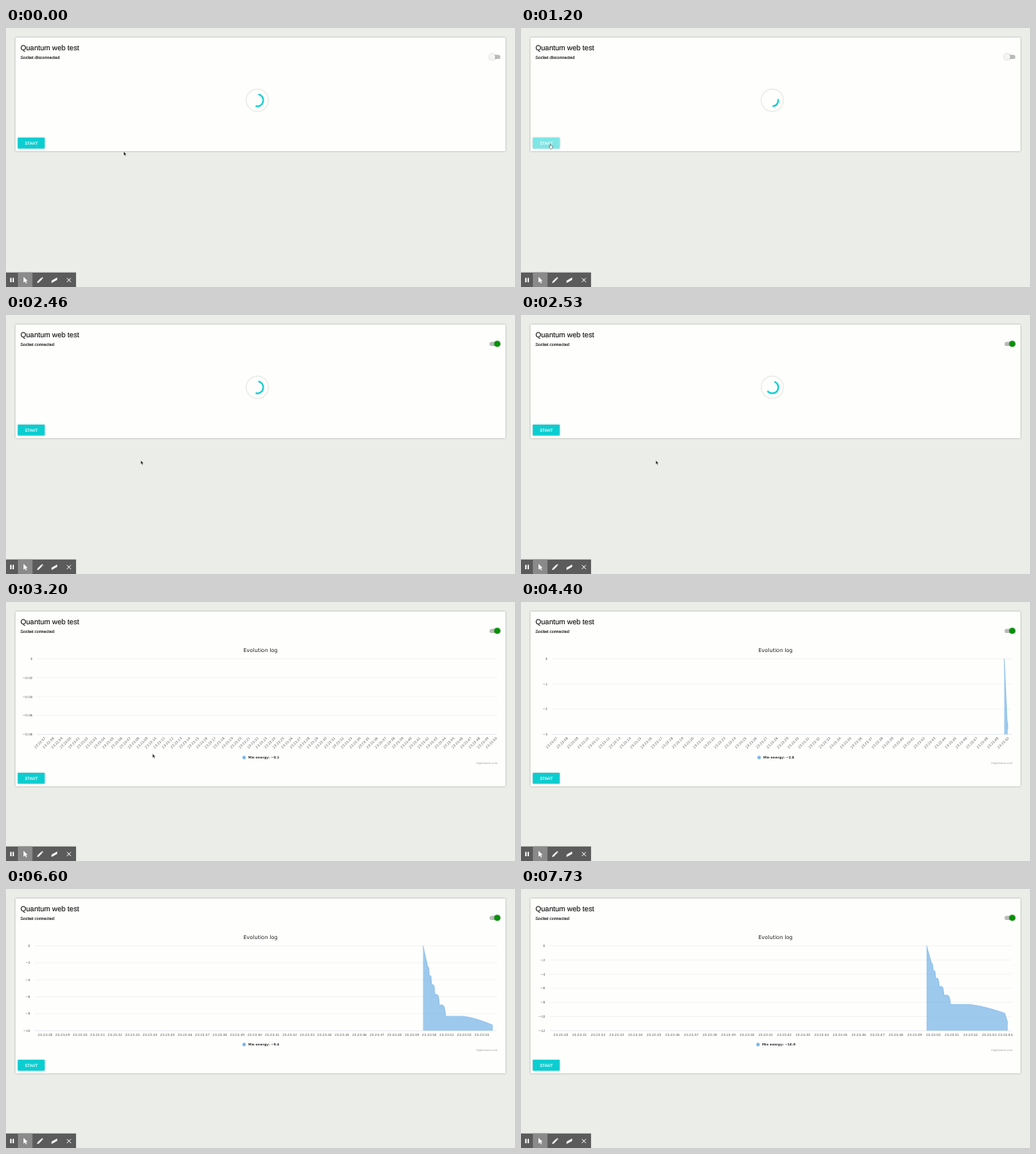
Animation, 640 px wide and 326 px high, one loop 8000 ms. Source, as an HTML page:

```html
<!DOCTYPE html>
<html lang="en">
<head>
<meta charset="utf-8">
<title>Quantum web test</title>
<style>
html, body { margin: 0; height: 100%; overflow: hidden; background: #ebede8; }
svg { display: block; width: 100vw; height: 100vh; text-rendering: geometricPrecision; }
text { font-family: "Liberation Sans", Arial, sans-serif; }
.label { fill: #111; stroke: #111; stroke-width: .12; }
#chart text { font-family: "DejaVu Sans", sans-serif; font-size: 4.1px; fill: #5c5c5c; }
#card { fill: #fefffd; filter: drop-shadow(0 .5px 1.1px rgba(0,0,0,.32)); }
.lift { filter: drop-shadow(0 .4px .8px rgba(0,0,0,.25)); }
</style>
</head>
<body>
<svg viewBox="0 0 640 326">
  <rect id="card" x="12" y="12" width="616" height="143" rx=".8"/>
  <text class="label" x="18.2" y="28.3" font-size="9.1">Quantum web test</text>
  <text class="label" id="status" x="18.2" y="38.6" font-size="5.35"></text>
  <rect x="608" y="33.8" width="13.6" height="5.2" rx="2.6" fill="#b9bcb9"/>
  <circle id="thumb" class="lift" cy="36.3" r="3.8"/>
  <g id="spinner">
    <circle class="lift" cx="316" cy="91" r="13.4" fill="#fefffd"/>
    <path id="arc" fill="none" stroke="#0ccdd0" stroke-width="2"/>
  </g>
  <g id="chart"></g>
  <g id="button">
    <rect class="lift" x="14.8" y="138" width="33.9" height="13.8" rx=".7" fill="#fefffd"/>
    <rect id="face" x="14.8" y="138" width="33.9" height="13.8" rx=".7" fill="#0ccdd0"/>
    <text x="31.9" y="147" font-size="5.2" fill="#fff" stroke="#fff" stroke-width=".12" text-anchor="middle">START</text>
  </g>
  <rect y="307.7" width="88.1" height="18.3" fill="#5b5b5b"/>
  <rect x="15" y="307.7" width="18.3" height="18.3" fill="#8a8a8a"/>
  <g fill="#fff">
    <path d="M5.3 314.5h1.7v5.4h-1.7zM8.3 314.5h1.7v5.4h-1.7z"/>
    <path d="M22 313.3l5.2 5-2.3.2 1.4 2.6-1.1.5-1.3-2.6-1.9 1.6z"/>
    <path d="M39.2 321l.4-1.9 4.5-4.5 1.5 1.5-4.5 4.5zM44.5 314.2l.9-.8 1.4 1.4-.8.9z"/>
    <path d="M57.3 318l7-3.9v3l-7 3.9z"/>
    <path d="M76.6 314.8l5 5M81.6 314.8l-5 5" stroke="#fff" stroke-width="1"/>
  </g>
  <g id="cursor" stroke="#fff" stroke-width=".4">
    <path id="arrow" d="M0 0v5l1.1-1 .8 1.8.9-.4-.8-1.7h1.6z" fill="#111"/>
    <path id="hand" d="M-.6 0q.6-.6 1 0l.2 2 2 .5v2l-.6 1.5h-2.4l-1.4-2.6.6-.4.6.7z" fill="#fff" stroke="#222"/>
  </g>
</svg>
<script>
const LOOP = 8000, OPEN = 2540, TOP = 71.5, RIGHT = 617, TIP = 612, BIRTH = 49.64;
const $ = id => document.getElementById(id);
const set = (id, attrs) => { for (const k in attrs) $(id).setAttribute(k, attrs[k]); };
const clamp = v => Math.max(0, Math.min(1, v));
const mix = (a, b, p) => a + (b - a) * p;
const ease = (t, start, dur) => (1 - Math.cos(Math.PI * clamp((t - start) / dur))) / 2;

// adds eased moves [start, duration, da, db] to a pair of values
const travel = ([a, b], moves, t) => moves.reduce(([x, y], [start, dur, da, db]) => {
  const p = ease(t, start, dur);
  return [x + da * p, y + db * p];
}, [a, b]);

// pointer: to the button, away, then down
const pointer = t => travel([148, 155.5], [[100, 870, -111, -9.5], [1530, 620, 132.5, 37], [2640, 440, 14.8, 8]], t);

// chart window: first visible second and newest sample
const timeSpan = t => travel([-3.9, 49.6],
  [[3530, 330, 7.3, .2], [4060, 1340, 21, 1.15], [5800, 130, 1, 1.22], [6260, 1, 2, 1.46], [6700, 1000, 2, .37]], t);

// steep start, five widening stairs, slow sag, last plunge
function energyAt(u) {
  let v = 2.5 * clamp(u / .27) + 1.15 * (Math.max(0, u - 2.2) / 1.9) ** 1.5 + 1.2 * clamp((u - 4.2) / .16);
  for (let k = 0; k < 5; k++) {
    const end = .35 * 1.385 ** k, start = end / 1.385;
    v += (1 + .08 * k) * clamp((u - start) / (end - start)) ** 7;
  }
  return -v;
}

const minus = s => String(s).replace('-', '\u2212');
const clock = s => '23:' + [23 + Math.floor(s / 60), (s + 60) % 60].map(n => String(n).padStart(2, '0')).join(':');
const text = (x, y, body, more = '') => `<text x="${x}" y="${y}" ${more}>${body}</text>`;
const line = (x, y, color) => `<path d="M${x} ${y}H${RIGHT}" stroke="${color}" stroke-width=".5"/>`;

function chart(t) {
  const [first, tip] = timeSpan(t);
  const value = Math.min(-.08, energyAt(tip - BIRTH));
  const step = [.02, .5, 1, 2].find(s => s >= -value / 5.5);
  const ticks = Math.ceil(-value / step);
  const tilted = 576 / (tip - first) < 20.5;
  const x0 = tilted ? 39 : 36, bottom = tilted ? 166.5 : 178.3;
  const rate = (TIP - x0) / (tip - first);
  const X = s => x0 + (s - first) * rate;
  const Y = v => TOP - v / (ticks * step) * (bottom - TOP);
  let out = text(320, 62.5, 'Evolution log', 'text-anchor="middle" style="font-size:6.65px;fill:#222"');

  for (let k = 0; k <= ticks; k++) {
    const y = Y(-k * step);
    out += line(x0, y, k < ticks ? '#e6e6e6' : '#ccd6eb')
      + text(x0 - 5.6, y + 1.5, minus(+(-k * step).toFixed(2)), 'text-anchor="end"');
  }

  if (tip > BIRTH) {
    const points = [];
    for (let s = BIRTH; s < tip; s += .01) points.push([X(s), Y(energyAt(s - BIRTH))]);
    points.push([TIP, Y(value)]);
    out += `<path d="M${points.join('L')}V${bottom}H${X(BIRTH)}Z" fill="#7cb7e8" fill-opacity=".75"/>
      <path d="M${points.join('L')}" fill="none" stroke="#7cb5ec" stroke-width=".8"/>`;
  }

  for (let s = Math.ceil(first); X(s) <= RIGHT; s++) {
    const x = X(s);
    if (tilted) out += text(0, 0, clock(s), `text-anchor="end" transform="translate(${x + 1.5} ${bottom + 5.2}) rotate(-45)"`);
    else out += text(Math.min(x, 608.8), 185.3, x > 609 && rate < 23 ? '23:2\u2026' : clock(s), 'text-anchor="middle"');
  }

  const energy = 'Min energy: ' + minus(value.toFixed(1)), lx = 304.4 - (energy.length - 16) * 1.4;
  return out + `<circle cx="${lx - 5}" cy="195.7" r="2.2" fill="#7cb5ec"/>`
    + text(lx, 197.3, energy, 'style="font-size:4.05px;font-weight:bold;fill:#333"')
    + text(618, 204.2, 'Highcharts.com', 'text-anchor="end" style="font-size:3.4px;fill:#999"');
}

function spin(t) {
  const cycle = 2460, grow = t < 1900 ? t + cycle : t;
  const shift = t < 1900 ? mix(8, 360, ease(t, 450, 1170)) : 8;
  const len = Math.min(252 * ease(grow, 1900, 850), 360 - shift);
  const from = -88 + t * 360 / cycle + shift;
  const at = deg => {
    const r = deg * Math.PI / 180;
    return `${316 + 7.6 * Math.cos(r)} ${91 + 7.6 * Math.sin(r)}`;
  };
  set('arc', { d: len < 1 ? '' : `M${at(from)}A7.6 7.6 0 ${+(len > 180)} 1 ${at(from + len)}` });
}

function draw(t) {
  const open = t >= OPEN, on = ease(t, 1600, 160);
  const hover = ease(t, 980, 150) - ease(t, 1530, 200), over = t > 940 && t < 1580;
  set('card', { height: open ? 220 : 143 });
  set('button', { transform: `translate(0 ${open ? 77 : 0})` });
  set('face', { opacity: 1 - .48 * hover });
  set('thumb', { cx: mix(611.3, 617.7, on), fill: `rgb(${mix(245, 8, on)},${mix(245, 145, on)},${mix(245, 8, on)})` });
  $('status').textContent = t < 1600 ? 'Socket disconnected' : 'Socket connected';
  set('spinner', { opacity: +!open });
  spin(t);
  $('chart').innerHTML = open ? chart(t) : '';
  set('cursor', { transform: `translate(${pointer(t)})`, opacity: +(t < 3460) });
  set('arrow', { opacity: +!over });
  set('hand', { opacity: +over });
}

function tick() {
  draw(performance.now() % LOOP);
  requestAnimationFrame(tick);
}
tick();
</script>
</body>
</html>
```
